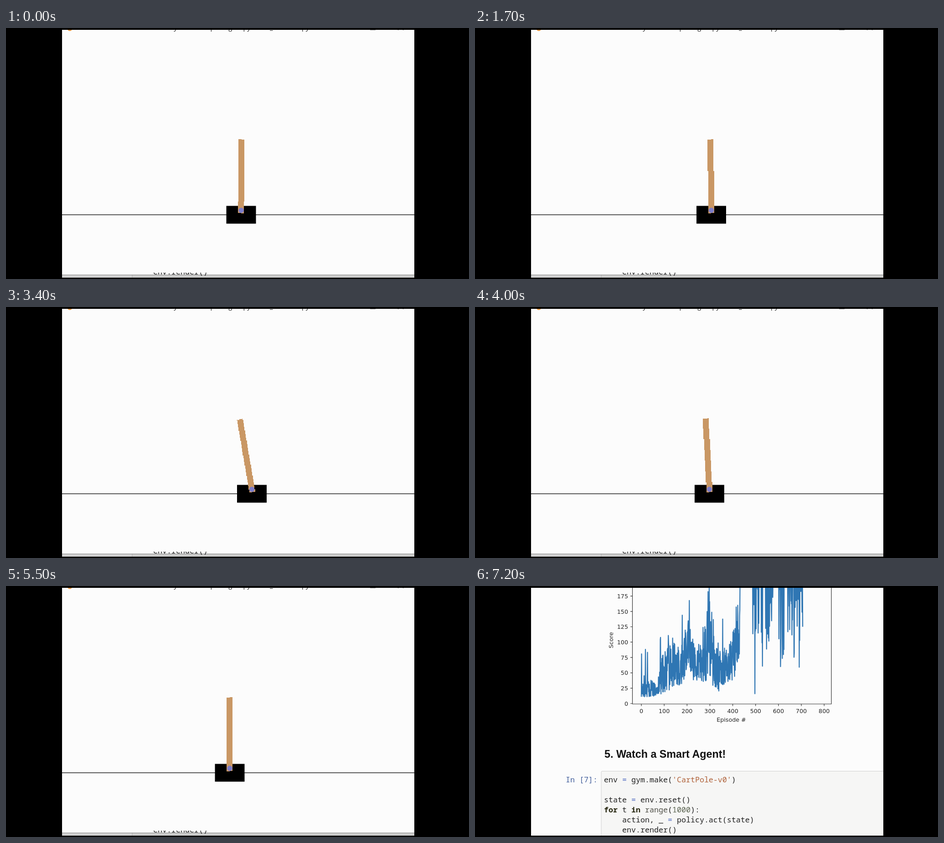
Animation of 1016 by 551 pixels, one loop 7300 ms. Source, as an HTML page:

```html
<!DOCTYPE html>
<html lang="en">
<head>
<meta charset="utf-8">
<title>Cart and pole</title>
<style>
  html, body { margin: 0; width: 100%; height: 100%; overflow: hidden; background: #000; }
  svg { display: block; width: 1016px; height: 551px; }
  text { white-space: pre; }
  .code { font: 16.67px "Noto Sans Mono", "DejaVu Sans Mono", monospace; fill: #222; }
  .axis { font: 12.7px "DejaVu Sans", sans-serif; fill: #262626; }
  .head { font: bold 23.3px "Liberation Sans", Arial, sans-serif; fill: #111; }
  .title { font: 14.6px "Open Sans", "Noto Sans", sans-serif; fill: #222; }
  .op { fill: #4a66c0; }
  .kw { font-weight: bold; fill: #26260f; }
  .str { fill: #b0623a; }
  .num { fill: #5a6350; }
  .fn { fill: #505048; }
</style>
</head>
<body>
<svg viewBox="0 0 1016 551" xmlns="http://www.w3.org/2000/svg">
  <defs>
    <clipPath id="view"><rect x="123" y="4" width="773" height="544"/></clipPath>
    <clipPath id="below"><rect x="277" y="537" width="619" height="11"/></clipPath>
    <linearGradient id="shade" x1="0" y1="0" x2="0" y2="1">
      <stop offset="0" stop-opacity=".28"/>
      <stop offset="1" stop-opacity=".08"/>
    </linearGradient>
  </defs>
  <rect width="1016" height="551"/>
  <g clip-path="url(#view)">
    <rect x="123" y="4" width="773" height="544" fill="#fcfcfc"/>

    <g id="chart">
      <path id="curve" fill="none" stroke="#2f76b3" stroke-width="2.2" stroke-linejoin="round"/>
      <path id="frame" fill="none" stroke="#333" stroke-width="1.2"/>
      <text class="axis" x="562.5" y="298" text-anchor="middle">Episode #</text>
      <text class="axis" transform="translate(303 119) rotate(-90)" text-anchor="middle">Score</text>
    </g>

    <text class="head" x="284" y="377">5. Watch a Smart Agent!</text>
    <rect x="277" y="406.5" width="640" height="160" rx="2" fill="#f6f6f5" stroke="#cfcfcf"/>
    <text id="prompt" class="code" x="199" y="431" style="fill:#45619d"></text>
    <g class="code">
      <text x="283" y="431">env <tspan class="op">=</tspan> gym.make(<tspan class="str">'CartPole-v0'</tspan>)</text>
      <text x="283" y="475">state <tspan class="op">=</tspan> env.reset()</text>
      <text x="283" y="497"><tspan class="kw">for</tspan> t <tspan class="kw">in</tspan> <tspan class="fn">range</tspan>(<tspan class="num">1000</tspan>):</text>
      <text x="283" y="519">    action, _ <tspan class="op">=</tspan> policy.act(state)</text>
      <text x="283" y="541">    env.render()</text>
    </g>

    <g id="window">
      <rect x="110" y="541" width="798" height="8" fill="url(#shade)"/>
      <rect x="119" y="-40" width="780" height="581" fill="#fcfcfc"/>
      <path d="M899.5 -40V541.5H119" fill="none" stroke="#b4b4b4"/>
      <circle cx="140" cy="1" r="5.5" fill="#e8953c"/>
      <text class="title" x="151" y="3.5">C:\Users\tolen\.conda\envs\unityml\lib\site-packages\ipykernel_launcher.py</text>
      <path id="buttons" d="M799 4H811M860 -7L872 5M872 -7L860 5" stroke="#333" fill="none"/>
      <g transform="translate(509 540) scale(1.3 -1.3)">
        <path d="M-300 100H300" stroke="#222" stroke-width="1.1"/>
        <rect id="cart" y="85" width="50" height="30"/>
        <path id="pole" fill="#c99764" shape-rendering="crispEdges"/>
        <circle id="axle" cy="107.5" r="4.4" fill="#7d7dc9"/>
      </g>
    </g>
    <g id="overText">
      <text class="code" x="283" y="541">    env.render()</text>
    </g>
  </g>
</svg>
<script>
const $ = id => document.getElementById(id);
const set = (id, name, value) => $(id).setAttribute(name, value);
const LOOP = 7300, STEP = 100, CLOSE = 6500, DONE = 6700;

// Turning points: [time, cart centre, pole angle in degrees]
const keys = [
  [0, 516, .45], [250, 514, 1.2], [900, 538, 0], [1700, 518.5, -.7], [2500, 505, 3],
  [3400, 539.5, -9.7], [4500, 487.5, 3.7], [5000, 480, 2.2], [5500, 491, -.25], [5900, 494.8, -.25]
];

function slope(i, k) {
  const a = keys[Math.max(i - 1, 0)], b = keys[Math.min(i + 1, keys.length - 1)];
  return (b[k] - a[k]) / (b[0] - a[0]);
}

function sample(t, k) {
  const i = keys.findIndex(key => key[0] > t) - 1;
  if (i < 0) return keys[keys.length - 1][k];
  const a = keys[i], b = keys[i + 1], d = b[0] - a[0], u = (t - a[0]) / d;
  const u2 = u * u, u3 = u2 * u;
  return (2 * u3 - 3 * u2 + 1) * a[k] + (3 * u2 - 2 * u3) * b[k]
    + d * ((u3 - 2 * u2 + u) * slope(i, k) + (u3 - u2) * slope(i + 1, k));
}

// Row by row, so the pole keeps its unsmoothed stair edges.
function polePath(x, deg) {
  const s = Math.sin(deg * Math.PI / 180), c = Math.cos(deg * Math.PI / 180);
  let d = "";
  for (let v = -6; v <= 121; v++) {
    const ends = [(-5 - v * c) / s, (120 - v * c) / s].sort((a, b) => a - b);
    const lo = Math.round(x + Math.max((v * s - 5) / c, ends[0]));
    const hi = Math.round(x + Math.min((v * s + 5) / c, ends[1]));
    if (hi > lo) d += `M${lo} ${v + 107}H${hi}v1H${lo}z`;
  }
  return d;
}

const px = episode => 365 + episode * .5015;
const py = score => 258 - score * 1.348;

let seed = 11;
const rnd = () => (seed = seed * 16807 % 2147483647) / 2147483647;
const ramp = (e, from, to) => Math.min(1, Math.max(0, (e - from) / (to - from)));
const bump = (e, mid, width) => Math.exp(-(((e - mid) / width) ** 2));

// Noisy learning up to episode 432, then a full score broken by bursts of failures.
const bursts = [[486, 514], [522, 575], [600, 628], [640, 706]];

function score(e) {
  const r = rnd(), spike = rnd();
  if (e >= 432) {
    const failing = bursts.some(([from, to]) => e >= from && e <= to);
    return failing && r < .3 ? 12 + 188 * Math.sqrt(spike) : 200;
  }
  const late = ramp(e, 395, 432);
  const low = 11 + 25 * ramp(e, 60, 200) - 16 * bump(e, 335, 25) + 25 * bump(e, 205, 15) + 60 * late ** 4;
  const high = 38 + 62 * ramp(e, 70, 105) + 45 * bump(e, 205, 15) + 95 * bump(e, 295, 22) + 110 * late;
  return low + (high - low) * r ** 1.4 + (spike < .05 ? 75 * rnd() : 0);
}

function label(x, y, s, anchor) {
  const t = document.createElementNS("http://www.w3.org/2000/svg", "text");
  const attrs = { class: "axis", x, y, "text-anchor": anchor };
  for (const name in attrs) t.setAttribute(name, attrs[name]);
  t.textContent = s;
  $("chart").appendChild(t);
}

function buildChart() {
  const points = Array.from({ length: 707 }, (_, e) => `${px(e).toFixed(1)} ${py(score(e)).toFixed(1)}`);
  set("curve", "d", "M" + points.join("L"));

  let frame = "M345.5 0V259H782V0";
  for (let e = 0; e <= 800; e += 100) {
    frame += `M${px(e)} 259v4.5`;
    label(px(e), 279, e, "middle");
  }
  for (let v = 0; v <= 175; v += 25) {
    frame += `M345.5 ${py(v)}h-4.5`;
    label(336, py(v) + 4.8, v, "end");
  }
  set("frame", "d", frame);
}

function draw(time) {
  const t = Math.floor(time % LOOP / STEP) * STEP;
  const x = (sample(t, 1) - 509) / 1.3;
  const closing = t >= CLOSE, gone = t >= CLOSE + STEP;
  set("cart", "x", x - 25);
  set("axle", "cx", x);
  set("pole", "d", polePath(x, sample(t, 2)));
  set("window", "opacity", gone ? 0 : closing ? .75 : 1);
  set("window", "transform", closing ? "translate(509 270) scale(.985) translate(-509 -270)" : "");
  set("buttons", "visibility", closing ? "hidden" : "visible");
  set("overText", "clip-path", closing ? "none" : "url(#below)");
  set("overText", "visibility", gone ? "hidden" : "visible");
  $("prompt").textContent = t < DONE ? "In [*]:" : "In [7]:";
}

buildChart();
const start = performance.now();
function tick() {
  draw(performance.now() - start);
  requestAnimationFrame(tick);
}
tick();
</script>
</body>
</html>
```
